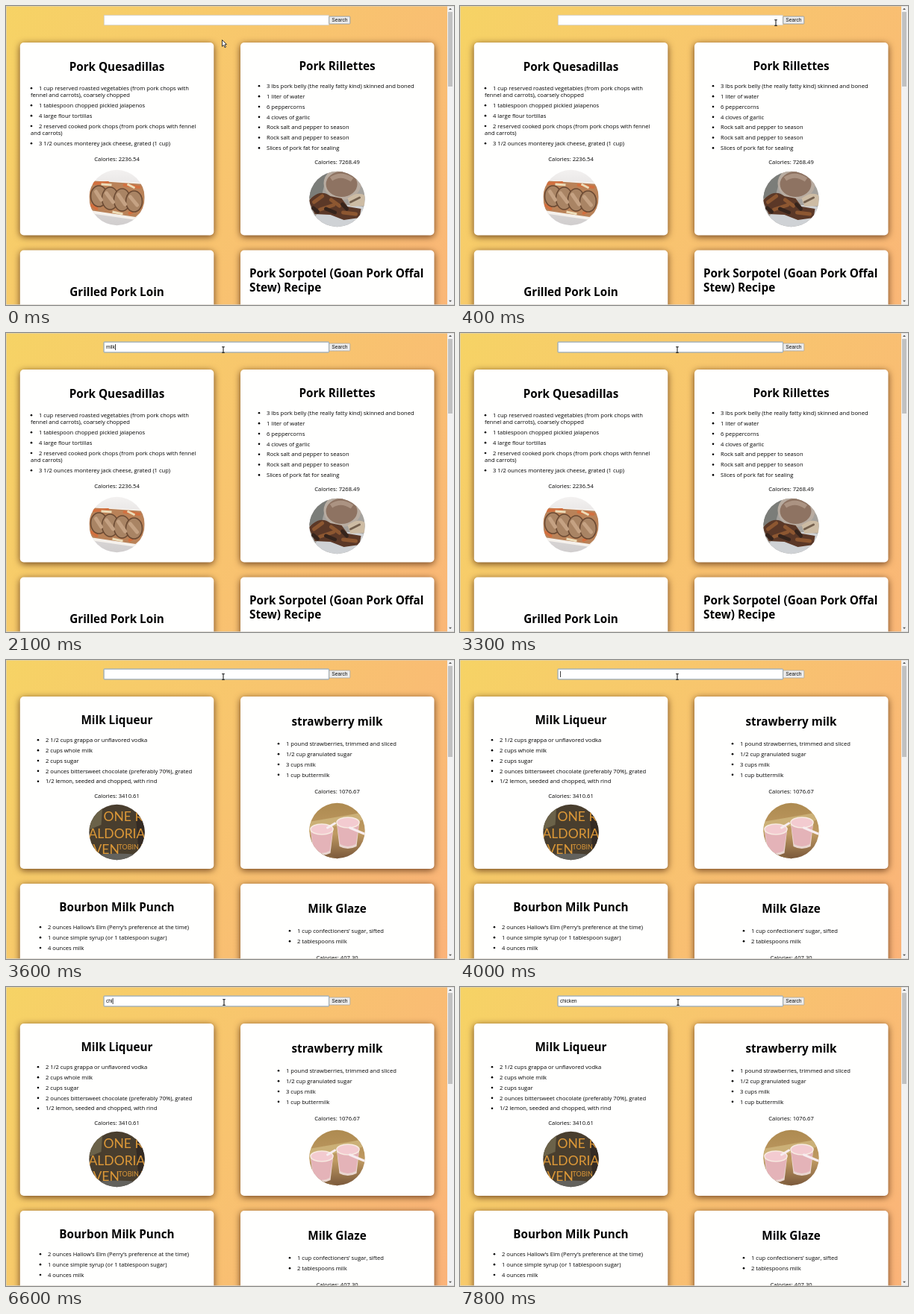
Recreate the animation shown at these times as an HTML page. Size 600 by 401 pixels, loop 8000 ms.

```html
<!DOCTYPE html>
<html lang="en">
<head>
<meta charset="utf-8">
<title>Recipe search</title>
<style>
html, body { margin: 0; width: 100%; height: 100%; overflow: hidden; background: #f6d365; }
#stage { position: relative; width: 600px; height: 401px; overflow: hidden; }
.backdrop { position: absolute; inset: 0 0 auto 0; width: 591px; background: linear-gradient(120deg, #f6d365, #fda085); }
svg { position: absolute; left: 0; top: 0; }
.card { fill: #fffffe; filter: drop-shadow(0 2.5px 5px rgba(85, 42, 15, .85)); }
.title { font: bold 15.25px "Open Sans", "Noto Sans", sans-serif; fill: #000; }
.body { font: 500 7.6px "Open Sans", "Noto Sans", sans-serif; fill: #000; }
.field { font: 6.67px "Liberation Sans", Arial, sans-serif; fill: #111; white-space: pre; }
.cover { font: 17.5px Lato, "Open Sans", sans-serif; fill: #dc9838; }
.mid { text-anchor: middle; }
</style>
</head>
<body>
<div id="stage">
  <div class="backdrop" id="backdrop"></div>
  <svg width="600" height="401" viewBox="0 0 600 401">
    <defs>
      <clipPath id="round"><circle r="37.2"/></clipPath>
      <linearGradient id="wood" x2="0" y2="1">
        <stop stop-color="#ad8a50"/><stop offset=".55" stop-color="#bf9a62"/><stop offset="1" stop-color="#79573a"/>
      </linearGradient>
      <linearGradient id="plate" x2="0" y2="1">
        <stop stop-color="#f3f1f0"/><stop offset="1" stop-color="#d0cdcd"/>
      </linearGradient>

      <g id="chops" clip-path="url(#round)">
        <rect x="-38" y="-38" width="76" height="76" fill="url(#plate)"/>
        <path d="M-40-24 36-20 38 20 26 30-36 21Z" fill="#f5f1ec"/>
        <path d="M-38-23 37-18 37 15 25 26-36 17Z" fill="#b98258"/>
        <path d="M-31-19-12-20M10-17 30-14M17 21 31 13M-34 10-27 15" stroke="#d2703f" stroke-width="4" stroke-linecap="round"/>
        <path d="M-21-18-7-17M14-18 24-13M-6 19 8 22" stroke="#ecdcb8" stroke-width="3"/>
        <g fill="#a98464" stroke="#6b4a33" stroke-width="1.6">
          <ellipse cx="-24" cy="-2" rx="11" ry="14"/><ellipse cx="-9" cy="1" rx="11" ry="15"/>
          <ellipse cx="7" cy="3" rx="11" ry="15"/><ellipse cx="23" cy="5" rx="11" ry="14"/>
        </g>
        <path d="M-28-8-21 3M-14-6-5 6M2-4 11 9M18-1 27 10" stroke="#c5a283" stroke-width="5" stroke-linecap="round"/>
      </g>

      <g id="roast" clip-path="url(#round)">
        <rect x="-38" y="-38" width="76" height="76" fill="#a5a29d"/>
        <path d="M-38-38H-12L-20-8-38 0Z" fill="#7b7d79"/>
        <ellipse cx="13" cy="25" rx="42" ry="17" fill="#cfd2d5"/>
        <ellipse cx="7" cy="-21" rx="25" ry="22" fill="#b8aca1"/>
        <ellipse cx="6" cy="-20" rx="21" ry="17" fill="#8e7362"/>
        <path d="M-8-27Q5-36 20-26" stroke="#ab9382" stroke-width="6" fill="none"/>
        <path d="M14-1Q27-11 37-5V9L18 10Z" fill="#cdbca4"/>
        <path d="M-38 2Q-23-15-9-4L6-1 14 10 32 13 30 25 9 28-9 21-30 20Z" fill="#5b3827"/>
        <path d="M-31 4-20-4M-23 14-5 8M8 18 25 20M-8 1 3 9" stroke="#8d5731" stroke-width="5" stroke-linecap="round"/>
        <path d="M-15 13-3 18M-32 12-26 17M7 7 13 13" stroke="#35241c" stroke-width="5" stroke-linecap="round"/>
        <path d="M18 4 30-2" stroke="#75614e" stroke-width="3" stroke-linecap="round"/>
      </g>

      <g id="book" clip-path="url(#round)">
        <rect x="-38" y="-38" width="76" height="76" fill="#493e2e"/>
        <path d="M-38-38H-19L-21-10-38-3Z" fill="#6b6249"/>
        <path d="M-38 32Q0 25 38 32V38H-38Z" fill="#63625d"/>
        <path d="M24-38H38V38H30Z" fill="#342b24"/>
        <text class="cover" x="-18" y="-15">ONE RE</text>
        <text class="cover" x="-38" y="8">ALDORIA</text>
        <text class="cover" x="-32" y="29">VEN</text>
        <text class="cover" x="2" y="23" style="font-size:9px">TOBIN K</text>
      </g>

      <g id="glasses" clip-path="url(#round)">
        <rect x="-38" y="-38" width="76" height="76" fill="url(#wood)"/>
        <path d="M-38-12 38-25V-15L-38 2Z" fill="#cbb077"/>
        <path d="M-38 22 3 38H-38Z" fill="#8a6843"/>
        <g id="glass">
          <path d="M-36-4H-5L-9 30Q-21 36-32 30Z" fill="#e9d6d0"/>
          <path d="M-35 2H-6L-10 27Q-21 33-31 27Z" fill="#e4b3b8"/>
          <ellipse cx="-20.5" cy="-2" rx="15" ry="7" fill="#f3cbd0" stroke="#f7eae1" stroke-width="1.5"/>
        </g>
        <use href="#glass" x="35" y="-9"/>
        <path d="M17-4 36 4M-13-4-3-10" stroke="#f7edf0" stroke-width="3" stroke-linecap="round"/>
      </g>
    </defs>

    <g id="pork"></g>
    <g id="milk"></g>

    <rect id="input" x="131.25" y="12.25" width="301" height="13.5" fill="#fff" stroke="#c9c6c1" stroke-width=".7"/>
    <rect id="ring" x="131" y="12" width="301.5" height="14" rx=".8" fill="none" stroke="#8ea9c4"/>
    <rect id="button" x="432.8" y="14" width="28" height="10" rx=".8" fill="#ececec" stroke="#aaa7a3" stroke-width=".8"/>
    <text class="field mid" x="446.9" y="21.3">Search</text>
    <text class="field" id="query" x="134" y="21.3"></text>
    <rect id="caret" y="15" width=".8" height="8" fill="#111"/>

    <rect x="591" width="9" height="401" fill="#f1f1f1"/>
    <rect id="thumb" x="592" y="8" width="6" fill="#c1c1c1"/>
    <path d="M593 5 595 2.8 597 5ZM593 394.7 595 397 597 394.7Z" fill="#555"/>
    <path d="M0 400.5H600M.25 0V401M0 .25H600" stroke="#d8d4cc" stroke-width=".7"/>

    <path id="arrow" d="M0 0V8.7L2.1 6.8 3.6 10.2 5 9.5 3.5 6.3 6 6Z" fill="#fff" stroke="#222" stroke-width=".9"/>
    <path id="beam" d="M-1.8-3.8H1.8M0-3.8V3.8M-1.8 3.8H1.8" fill="none" stroke="#111"/>
  </svg>
</div>
<script>
const LOOP = 8000, SWITCH = 3600, FOCUS = 800, PITCH = 13.85;
const LEFT = 148.5, RIGHT = 443.5;
const $ = id => document.getElementById(id);

const text = (cls, x, y, str) => `<text class="${cls}" x="${x}" y="${y}">${str}</text>`;
const card = (x, y, h) => `<rect class="card" x="${x}" y="${y}" width="259.5" height="${h}" rx="5"/>`;
const title = (x, y, str) => text('title mid', x, y, str);
const calories = (x, y, n) => text('body mid', x, y, `Calories: ${n}`);
const photo = (id, x, y) => `<use href="#${id}" x="${x}" y="${y}"/>`;
const item = (x, y, str) => `<circle cx="${x - 10}" cy="${y - 2.7}" r="1.3"/>` + text('body', x, y, str);
const list = (x, y, items) => items.map((str, i) => item(x, y + i * PITCH, str)).join('');
const cards = (bottom, next) => [18.8, 314].map(x => card(x, 49, bottom - 49) + card(x, next, 120)).join('');

$('pork').innerHTML = cards(307.5, 327.5) +
  title(LEFT, 87, 'Pork Quesadillas') +
  item(44, 113, '1 cup reserved roasted vegetables (from pork chops with') +
  text('body', 33, 122, 'fennel and carrots), coarsely chopped') +
  list(44, 136, ['1 tablespoon chopped pickled jalapenos', '4 large flour tortillas',
    '2 reserved cooked pork chops (from pork chops with fennel']) +
  text('body', 33, 173, 'and carrots)') +
  item(44, 187, '3 1/2 ounces monterey jack cheese, grated (1 cup)') +
  calories(LEFT, 208, '2236.54') + photo('chops', LEFT, 257) +
  title(RIGHT, 86, 'Pork Rillettes') +
  list(349, 110, ['3 lbs pork belly (the really fatty kind) skinned and boned', '1 liter of water',
    '6 peppercorns', '4 cloves of garlic', 'Rock salt and pepper to season',
    'Rock salt and pepper to season', 'Slices of pork fat for sealing']) +
  calories(RIGHT, 212, '7268.49') + photo('roast', RIGHT, 259) +
  title(LEFT, 389, 'Grilled Pork Loin') +
  text('title', 326, 364, 'Pork Sorpotel (Goan Pork Offal') +
  text('title', 326, 382.5, 'Stew) Recipe');

$('milk').innerHTML = cards(280, 300) +
  title(LEFT, 86, 'Milk Liqueur') +
  list(53, 110, ['2 1/2 cups grappa or unflavored vodka', '2 cups whole milk', '2 cups sugar',
    '2 ounces bittersweet chocolate (preferably 70%), grated',
    '1/2 lemon, seeded and chopped, with rind']) +
  calories(LEFT, 185, '3410.61') + photo('book', LEFT, 231) +
  title(RIGHT, 87.5, 'strawberry milk') +
  list(375, 115, ['1 pound strawberries, trimmed and sliced', '1/2 cup granulated sugar',
    '3 cups milk', '1 cup buttermilk']) +
  calories(RIGHT, 179, '1076.67') + photo('glasses', RIGHT, 229) +
  title(LEFT, 337, 'Bourbon Milk Punch') +
  list(56, 361, ['2 ounces Hallow’s Elm (Perry’s preference at the time)',
    '1 ounce simple syrup (or 1 tablespoon sugar)', '4 ounces milk']) +
  title(RIGHT, 338.5, 'Milk Glaze') +
  list(390, 366, ['1 cup confectioners’ sugar, sifted', '2 tablespoons milk']) +
  calories(RIGHT, 402, '407.30');

// Each track holds [start time, values...]; the latest started entry applies.
const typing = [[0, ''], [1500, 'm'], [1800, 'mi'], [1900, 'mil'], [2100, 'milk'], [2800, ''],
  [6300, 'c'], [6400, 'ch'], [6600, 'chi'], [6800, 'chic'], [6900, 'chick'], [7100, 'chicke'], [7200, 'chicken']];
const blink = [[0, 0], [800, 1], [1300, 0], [1500, 1], [2700, 0], [2800, 1], [3300, 0],
  [4000, 1], [4600, 0], [5100, 1], [5800, 0], [6300, 1], [7800, 0]];
const pointer = [[0, 'arrow', 289.5, 45.5], [300, 'arrow', 350, 33], [400, 'beam', 423, 22.5], [700, 'beam', 291, 22.5],
  [4600, 'beam', 292, 25], [4700, 'arrow', 293, 34], [4800, 'arrow', 295, 46], [4900, 'arrow', 294, 44],
  [5000, 'arrow', 293, 35], [5100, 'beam', 292, 24], [5200, 'beam', 292, 20.5]];
const at = (track, t) => track.findLast(entry => entry[0] <= t).slice(1);
const show = (id, on) => { $(id).style.display = on ? '' : 'none'; };

const measure = document.createElement('canvas').getContext('2d');
measure.font = '6.67px "Liberation Sans", Arial, sans-serif';

function draw(now) {
  const t = now % LOOP, milk = t >= SWITCH, focused = t >= FOCUS;
  show('pork', !milk);
  show('milk', milk);
  $('backdrop').style.height = milk ? '1262px' : '1550px';
  $('thumb').setAttribute('height', milk ? 122 : 100);

  show('ring', focused);
  $('button').setAttribute('stroke', focused ? '#aaa7a3' : '#8593a3');

  const [query] = at(typing, t);
  $('query').textContent = query;
  $('caret').setAttribute('x', 134.2 + measure.measureText(query).width);
  show('caret', at(blink, t)[0]);

  const [shape, x, y] = at(pointer, t);
  show('arrow', shape === 'arrow');
  show('beam', shape === 'beam');
  $(shape).setAttribute('transform', `translate(${x} ${y})`);
}

const start = performance.now();
function tick() {
  draw(performance.now() - start);
  requestAnimationFrame(tick);
}
tick();
</script>
</body>
</html>
```
